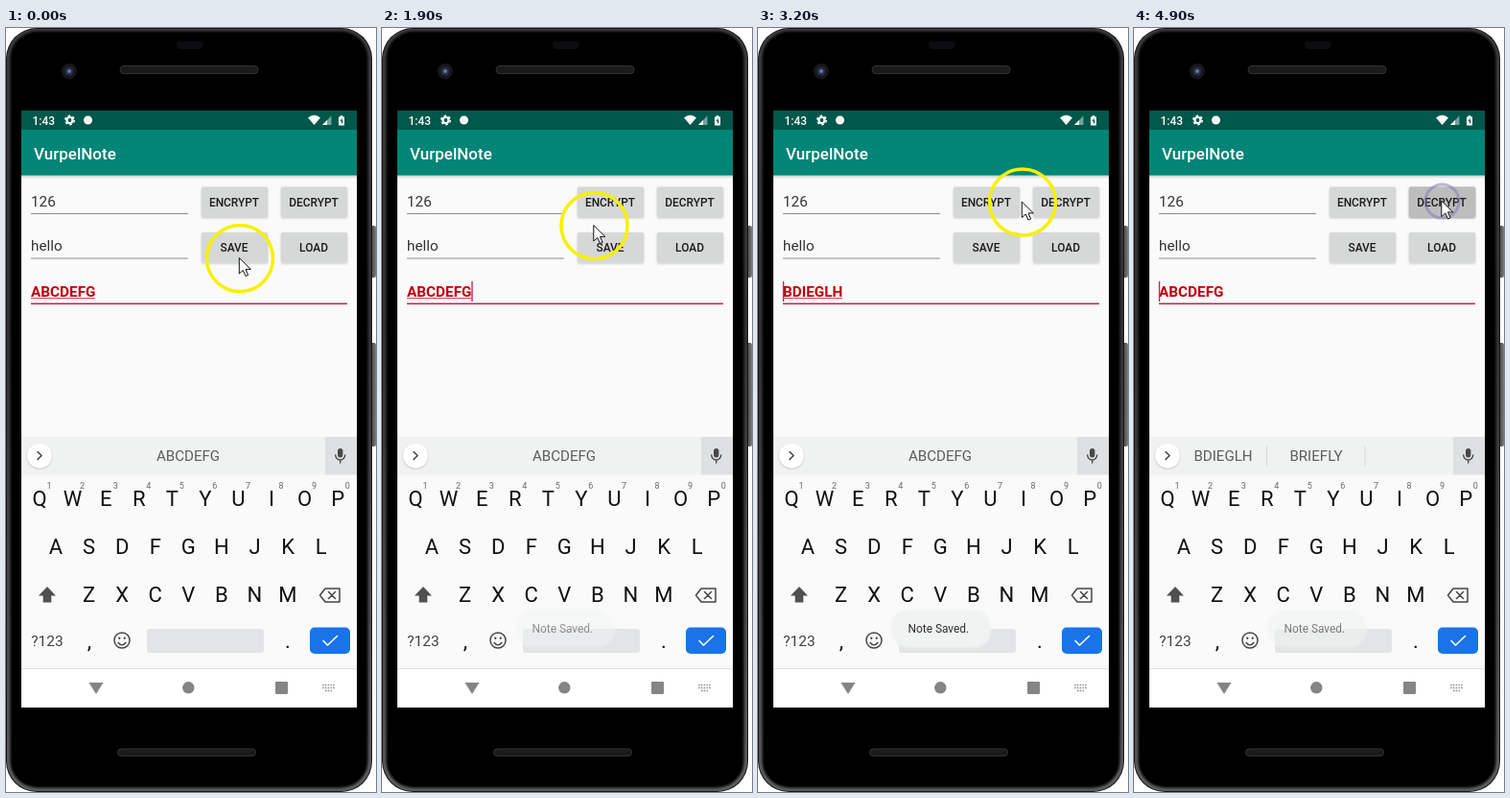
Animation of 386x796 px, one loop 5 s. Source, as an HTML page:

```html
<!DOCTYPE html>
<html lang="en">
<head>
<meta charset="utf-8">
<title>Phone note demo</title>
<style>
  html, body { margin: 0; width: 100%; height: 100%; overflow: hidden; background: #fff; }
  svg { display: block; width: 386px; height: 796px; font-family: Roboto, sans-serif; }
  .mid { text-anchor: middle; }
  .btn { font-size: 11.9px; font-weight: 500; fill: #1c1c1c; }
  .key { font-size: 22px; fill: #101010; }
  .hint { font-size: 9px; fill: #666; }
  .word { font-size: 15.1px; fill: #5a5c5e; }
  .line { fill: none; stroke-linecap: round; stroke-linejoin: round; }
</style>
</head>
<body>
<svg viewBox="0 0 386 796">
  <defs>
    <linearGradient id="rim" x2="0" y2="1">
      <stop stop-color="#3c3c3c"/><stop offset=".4" stop-color="#333"/>
      <stop offset="1" stop-color="#5c5c5c"/>
    </linearGradient>
    <linearGradient id="side">
      <stop stop-color="#2c2c2c"/><stop offset="1" stop-color="#7c7c7c"/>
    </linearGradient>
    <linearGradient id="fall" x2="0" y2="1">
      <stop stop-color="#000" stop-opacity=".22"/><stop offset="1" stop-color="#000" stop-opacity="0"/>
    </linearGradient>
    <filter id="soft" x="-20%" y="-40%" width="140%" height="190%">
      <feDropShadow dx="0" dy="1" stdDeviation="1" flood-opacity=".22"/>
    </filter>
    <filter id="blur"><feGaussianBlur stdDeviation="1.2"/></filter>
  </defs>

  <!-- phone -->
  <g fill="url(#side)">
    <rect x="379" y="206" width="7" height="54" rx="2"/>
    <rect x="379" y="328" width="7" height="108" rx="2"/>
  </g>
  <rect width="382" height="796" rx="32" fill="#161616"/>
  <rect x="1" y="1" width="380" height="794" rx="31" fill="url(#rim)"/>
  <rect x="4.500" y="3.500" width="373" height="788" rx="28" fill="#000" filter="url(#blur)"/>
  <rect x="178" y="14" width="27" height="8" rx="3" fill="#0d0d0f"/>
  <g fill="#1b1b1b" stroke="#333">
    <rect x="119" y="39.500" width="144" height="8" rx="4"/>
    <rect x="116.500" y="751" width="144" height="7.500" rx="3.700"/>
  </g>
  <circle cx="66" cy="45" r="8" fill="#17181d"/>
  <circle cx="66" cy="45" r="4.500" fill="#272c45"/>
  <circle cx="66" cy="45" r="2" fill="#72789a"/>

  <!-- screen -->
  <rect x="16" y="86" width="350" height="622" fill="#fafafa"/>
  <rect x="16" y="153" width="350" height="4" fill="url(#fall)"/>
  <rect x="16" y="86" width="350" height="20" fill="#00574b"/>
  <rect x="16" y="106" width="350" height="47.500" fill="#008577"/>
  <g fill="#fff">
    <text x="27.500" y="100.700" font-size="12" font-weight="500">1:43</text>
    <circle cx="66.500" cy="96" r="3" fill="none" stroke="#fff" stroke-width="2.200"/>
    <circle cx="66.500" cy="96" r="4.700" fill="none" stroke="#fff" stroke-width="1.600" stroke-dasharray="2.460"/>
    <circle cx="85.500" cy="96" r="4.500"/>
    <path d="M315 93.500Q321.500 88 328 93.500L321.500 101Z"/>
    <path d="M330 101L339.500 91.500V101Z" opacity=".45"/>
    <path d="M330 101L335 96V101Z"/>
    <path d="M347 92.500h1.700v-1.300h2.600v1.300h1.700v9h-6Z"/>
    <path d="M350.500 93.500l-2 3.800h1.500v3l2-3.800h-1.500Z" fill="#00574b"/>
    <text x="29" y="136.800" font-size="17" font-weight="500">VurpelNote</text>
  </g>

  <g font-size="15.300" fill="#333">
    <text x="26" y="186">126</text>
    <text x="26" y="232">hello</text>
  </g>
  <path d="M26 193.500H190M26 240H190" stroke="#8c8c8c"/>
  <path d="M26 287.200H356" stroke="#c9215b" stroke-width="1.400"/>
  <text id="note" x="26" y="280" font-size="15.300" font-weight="700" fill="#c0000c"></text>
  <path id="spell" stroke="#c0000c"/>
  <rect id="caret" y="264" width="1.400" height="21" fill="#d0205c"/>
  <g id="buttons"></g>

  <!-- keyboard -->
  <rect x="16" y="426" width="350" height="39.500" fill="#f0f1f1"/>
  <rect x="333" y="426" width="33" height="39.500" fill="#dfe0e1"/>
  <circle cx="35" cy="445.500" r="12.700" fill="#fff" filter="url(#soft)"/>
  <path class="line" d="M33 441.500l4 4-4 4" stroke="#444" stroke-width="1.600"/>
  <rect x="346" y="438" width="5.400" height="9.500" rx="2.700" fill="#484848"/>
  <path class="line" d="M343.700 445a5 5 0 0 0 10 0M348.700 450v3" stroke="#484848" stroke-width="1.400"/>
  <g class="word mid" id="before"><text x="190" y="451.300">ABCDEFG</text></g>
  <g class="word mid" id="after">
    <text x="93" y="451.300">BDIEGLH</text><text x="190" y="451.300">BRIEFLY</text>
    <path d="M138.500 436v20M241 436v20" stroke="#d6d7d8"/>
  </g>
  <g id="keys"></g>
  <path d="M43 582l9 9.500h-4.700v7h-8.600v-7h-4.700Z" fill="#505050"/>
  <path class="line" d="M333 584h15v14h-15l-5.500-7ZM336.500 587.500l7 7m0-7l-7 7" stroke="#444" stroke-width="1.500"/>
  <text class="mid" x="43" y="643.800" font-size="15.500" fill="#404040">?123</text>
  <g class="line" stroke="#444" stroke-width="1.500">
    <circle cx="121" cy="638" r="8"/><path d="M117 640.500q4 4.500 8 0"/>
  </g>
  <path d="M118.300 635.700v.1M123.700 635.700v.1" stroke="#444" stroke-width="2.300" stroke-linecap="round"/>
  <rect x="147" y="626" width="122" height="25" rx="3" fill="#e3e4e5"/>
  <rect x="317" y="624.500" width="42" height="27.500" rx="5" fill="#1a73e8"/>
  <path class="line" d="M331 638.500l4.500 4.500 10-9.500" stroke="#fff" stroke-width="1.600"/>

  <!-- navigation bar -->
  <rect x="16" y="667" width="350" height="41" fill="#fff"/>
  <path d="M16 667.500H366" stroke="#e1e1e1"/>
  <g fill="#858585">
    <path d="M86.500 682h15l-7.500 12Z"/><circle cx="190.300" cy="687.300" r="6.200"/>
    <rect x="281" y="681" width="13" height="13" rx="1"/>
  </g>
  <path d="M330 684.500h13M330 687.500h13M333 690.500h7" stroke="#8c8c8c" stroke-width="1.500" stroke-dasharray="1.500 1.300"/>

  <g id="toast">
    <rect x="139" y="605.500" width="104" height="40" rx="18" fill="#f1f3f3" filter="url(#blur)"/>
    <text x="156.500" y="630" font-size="11.900" fill="#303030">Note Saved.</text>
  </g>

  <circle id="ring" fill="none"/>
  <path id="pointer" d="M0 0V16.500L4 12.900L6.700 19L9.300 17.900L6.700 11.900H12Z" fill="#fff" stroke="#111"/>
</svg>

<script>
const $ = id => document.getElementById(id);
const set = (id, attrs) => {
  for (const name in attrs) $(id).setAttribute(name, attrs[name]);
};
const clamp = v => Math.max(0, Math.min(1, v));
const LOOP = 5000, STEP = 100, PITCH = 34.58;

// Buttons, each with the time it is pressed and released
const buttons = [
  ['ENCRYPT', 204, 165.5, 2500, 3000], ['DECRYPT', 287, 165.5, 4500, 5200],
  ['SAVE', 204, 213, 700, 1400], ['LOAD', 287, 213, 9000, 9000]
];
$('buttons').innerHTML = buttons.map(([label, x, y], i) => {
  const box = `x="${x}" y="${y}" width="69" height="31.5" rx="1.5"`;
  return `<rect ${box} fill="#d6d7d7" filter="url(#soft)"/>
    <rect id="press${i}" ${box} fill="#bdbdbe" filter="url(#soft)"/>
    <text class="btn mid" x="${x + 34}" y="${y + 20}">${label}</text>`;
}).join('');

const letterRow = (letters, x, y) => [...letters].map((c, i) =>
  `<text class="key mid" x="${x + i * PITCH}" y="${y}">${c}</text>`).join('');
$('keys').innerHTML = letterRow('QWERTYUIOP', 35, 498.3) + letterRow('ASDFGHJKL', 52, 548.3) +
  letterRow('ZXCVBNM', 86.5, 598.3) + letterRow(',', 87, 645.5) + letterRow('.', 294, 645.5) +
  [...'1234567890'].map((c, i) =>
    `<text class="hint mid" x="${45 + i * PITCH}" y="480">${c}</text>`).join('');

// Pointer path: time, x, y
const path = [
  [0, 244, 240], [200, 244, 240], [300, 251, 229], [400, 241.5, 229], [1600, 241.5, 229],
  [1900, 221.5, 206], [2000, 222, 200], [2200, 236, 186], [2300, 236.5, 184], [3100, 236.5, 184],
  [3200, 276, 181.5], [3400, 318, 175], [3600, 331, 176], [3700, 330, 178], [3800, 325, 178.5],
  [4200, 325, 178.5], [4300, 322.5, 179], [4400, 321.5, 180.5], [5000, 321.5, 180.5]
];
// Clicks: ring starts shrinking, ring is gone, ring comes back
const clicks = [[300, 1400, 1700], [2300, 3000, 3200], [4300, 5000, 5000]];
const toastFade = [[0, 0], [1700, 0], [1900, .5], [2300, .75], [2700, 1], [4700, 1], [5000, .4]];

function sample(keys, t, column = 1) {
  const i = Math.max(1, keys.findIndex(k => k[0] >= t));
  const a = keys[i - 1], b = keys[i];
  return a[column] + (b[column] - a[column]) * (t - a[0]) / (b[0] - a[0]);
}

function draw(t) {
  const x = sample(path, t), y = sample(path, t, 2);
  set('pointer', { transform: `translate(${x - .7} ${y - .5})` });

  const click = clicks.find(c => t >= c[0] && t < c[2]);
  const shrink = click ? clamp((t - click[0]) / 100) : 0;
  set('ring', {
    cx: x, cy: y, r: 34.5 - 17 * shrink,
    stroke: shrink < 1 ? '#f7f100' : '#7d78b4',
    'stroke-width': 3.5 - .5 * shrink,
    opacity: click && t >= click[1] ? 0 : 1 - .5 * shrink
  });

  buttons.forEach(([, , , down, up], i) =>
    set('press' + i, { opacity: clamp((t - down) / 200) * clamp((up - t) / 200) }));

  const encrypted = t >= 2800 && t < 4800;
  const moved = t >= 2800;
  $('note').textContent = encrypted ? 'BDIEGLH' : 'ABCDEFG';
  set('spell', {
    d: `M26 281.500H${encrypted ? 88 : 93}`,
    opacity: (moved && t < 3200) || t >= 4800 ? 0 : .7
  });
  set('caret', {
    x: moved ? 25.8 : 93.3,
    opacity: t < 400 || (t >= 4300 && t < 4800) ? 0 : 1
  });

  set('before', { opacity: t < 3700 ? 1 : 0 });
  set('after', { opacity: t < 3700 ? 0 : 1 });
  set('toast', { opacity: sample(toastFade, t) });
}

function tick() {
  draw(Math.floor(performance.now() % LOOP / STEP) * STEP);
  requestAnimationFrame(tick);
}
tick();
</script>
</body>
</html>
```
